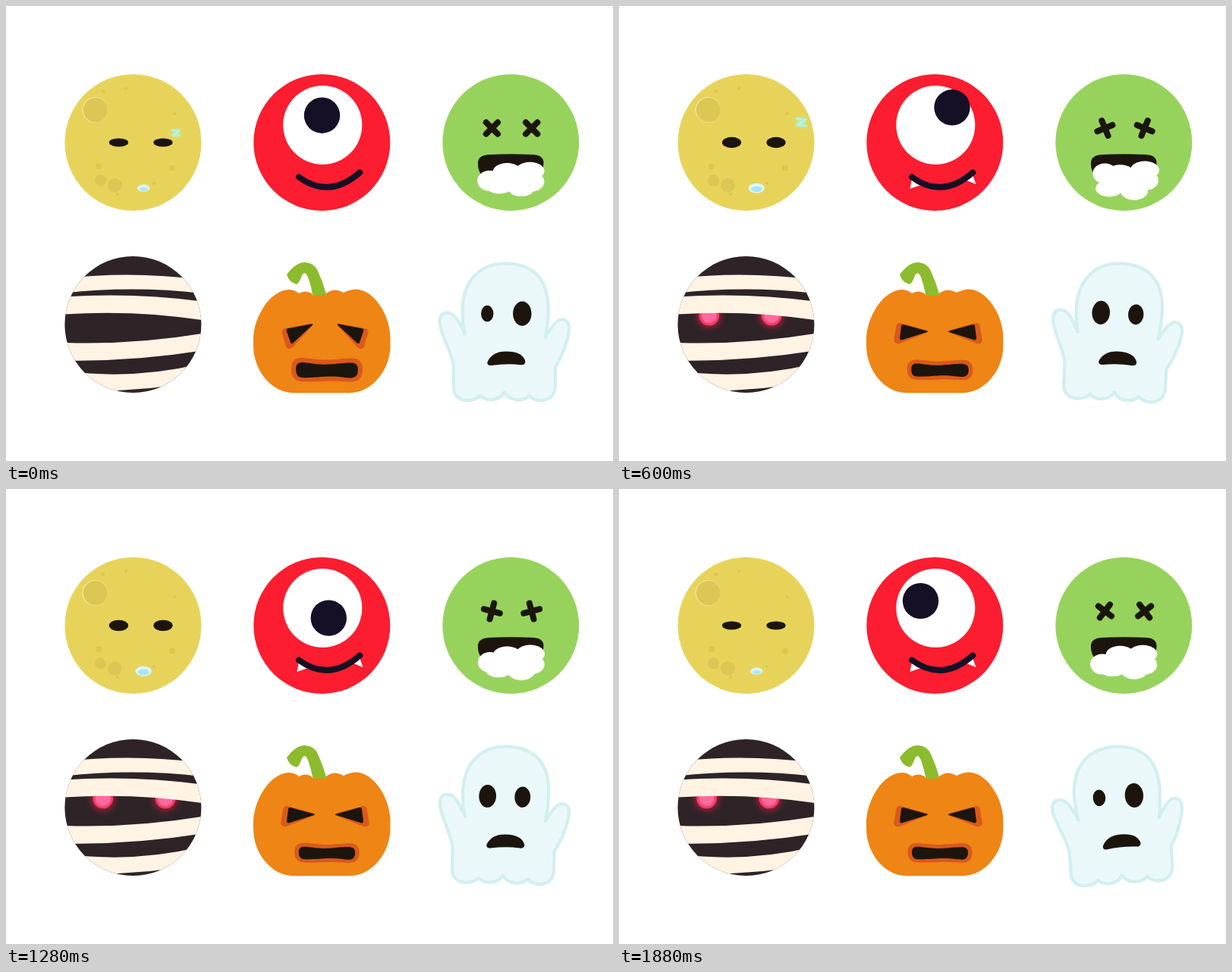
An HTML page with a canvas that plays this animation: 800 px wide and 600 px high, repeating every 1.92 s.

```html
<!DOCTYPE html>
<html lang="en">
<head>
<meta charset="utf-8">
<title>Six spooky faces</title>
<style>
html, body { margin: 0; width: 100%; height: 100%; overflow: hidden; background: #fff; }
canvas { display: block; width: 800px; height: 600px; }
</style>
</head>
<body>
<canvas id="stage" width="800" height="600"></canvas>
<script>
const g = document.getElementById('stage').getContext('2d');
const LOOP = 1920, STEP = 40;
const INK = '#1c150d';

const clamp = u => Math.min(1, Math.max(0, u));
const easeOut = u => 1 - Math.pow(1 - clamp(u), 3);
// Cosine swing between -1 and 1 that peaks at the given time
const swing = (t, period, peak = 0) => Math.cos((t - peak) / period * Math.PI * 2);

// Smooth path through key points [time, x, y] without overshoot
function glide(t, keys, axis) {
  const last = keys.length - 1;
  let i = 0;
  while (i < last - 1 && t >= keys[i + 1][0]) i++;
  const slope = j => (keys[j + 1][axis] - keys[j][axis]) / (keys[j + 1][0] - keys[j][0]);
  const tangent = j => {
    const a = slope(Math.max(j - 1, 0)), b = slope(Math.min(j, last - 1));
    return a * b > 0 ? 2 * a * b / (a + b) : 0;
  };
  const d = keys[i + 1][0] - keys[i][0], u = (t - keys[i][0]) / d, w = 1 - u;
  return keys[i][axis] * (1 + 2 * u) * w * w + tangent(i) * d * u * w * w
    + keys[i + 1][axis] * u * u * (3 - 2 * u) - tangent(i + 1) * d * u * u * w;
}

function oval(x, y, rx, ry, color) {
  g.beginPath();
  g.ellipse(x, y, rx, ry, 0, 0, Math.PI * 2);
  g.fillStyle = color;
  g.fill();
}
const disc = (x, y, r, color) => oval(x, y, r, r, color);

function shape(d, color) {
  g.fillStyle = color;
  g.fill(new Path2D(d));
}

function outline(d, color, width) {
  g.strokeStyle = color;
  g.lineWidth = width;
  g.lineCap = g.lineJoin = 'round';
  g.stroke(new Path2D(d));
}

function scoped(draw) {
  g.save();
  draw();
  g.restore();
}

function around(x, y, deg, sx = 1, sy = sx) {
  g.translate(x, y);
  g.rotate(deg * Math.PI / 180);
  g.scale(sx, sy);
  g.translate(-x, -y);
}

// Moon
const CRATERS = [
  [124.5, 229.5, 7.5], [143.5, 236, 9.5], [122, 210.7, 4], [219, 213.2, 4],
  [128, 112, 2.5], [158, 108, 2], [222, 141.5, 2], [195, 233.5, 2], [147, 247.5, 2]
];

function moon(t) {
  disc(167.5, 179.4, 90, '#e8d35a');
  disc(117.2, 136.3, 16.8, '#f0e49a');
  disc(117.8, 136.5, 16, '#dcc755');
  for (const [x, y, r] of CRATERS) disc(x, y, r, '#dcc755');

  const open = -swing(t, LOOP);
  for (const x of [148.5, 207]) oval(x, 179.4, 12.6, 6.75 + 1.15 * open, INK);
  oval(181.2, 239.6, 9.8 + 1.7 * open, 6 + 1.4 * open, '#dcf6f6');
  oval(181.5, 241, 6.8 + 1.2 * open, 3.5 + open, '#a9e6f8');

  // Drifting Z
  scoped(() => {
    const s = 1 + t / 2400;
    g.globalAlpha = clamp((1000 - t) / 200);
    g.translate(224 + t * 0.0272, 166.6 - t * 0.0233);
    g.rotate(t / 6300);
    g.scale(s, s);
    g.shadowColor = '#a8f8e8';
    g.shadowBlur = 4;
    outline('M-5 -3.2 L4.6 -3.2 L-4.2 3.2 L5.2 3.2', '#a9f6ea', 2.2);
  });
}

// One-eyed red face
const GAZE = [
  [0, 416.5, 143.6], [320, 434.5, 132.6], [600, 439, 133.2], [760, 437, 150.2],
  [1040, 427.5, 165.8], [1480, 423, 170.7], [1680, 404, 153.4], [1880, 397.5, 147]
];

function cyclops(t) {
  disc(416.3, 179.4, 90, '#fc1d30');
  disc(417.3, 156.4, 52, '#fff');
  disc(glide(t, GAZE, 1), glide(t, GAZE, 2), 23.7, '#151025');

  const grow = easeOut(t / 280);
  scoped(() => {
    around(391, 230, 0, grow);
    shape('M386 228 L383.5 240.5 L398 235.5 Z', '#fff');
  });
  scoped(() => {
    around(463, 225, 0, grow);
    shape('M466 222 L470.5 234.5 L458 229.5 Z', '#fff');
  });
  outline('M386 225 Q426 254.5 466.3 219', '#151025', 8);
}

// Zombie foam: x, y, radii, sway in x and y
const FOAM = [
  [638.5, 226, 16, 13.5, 2, -6], [660.5, 219.3, 19, 12, 0, 1.5],
  [691.5, 216.6, 19, 12, 1.5, -0.8], [693, 230.5, 17, 13, 1, -1],
  [648.5, 237.6, 18, 11, -2.5, 2.5], [679, 241, 18, 11.5, 0, 3],
  [666, 230, 22, 14, 0, 0]
];

function zombie(t) {
  disc(665.3, 179.4, 90, '#97d35c');
  const angle = 45 + t * 360 / LOOP;
  for (const [x, dir] of [[640.4, 1], [692.7, -1]]) scoped(() => {
    around(x, 160.5, angle * dir);
    outline(`M${x - 10.8} 160.5 h21.6 M${x} 149.7 v21.6`, INK, 8);
  });
  shape('M622 208 Q621 196.5 636 195.5 Q665 194 695 195.5 Q709 196.5 708.5 207 ' +
    'C708 226 690 236 665 236 C640 236 622 226 622 208 Z', INK);
  const w = swing(t, LOOP, 700);
  for (const [x, y, rx, ry, dx, dy] of FOAM) oval(x + dx * w, y + dy * w, rx, ry, '#fff');
}

// Mummy
const BANDAGES = [
  'M77 358.5 Q167.5 348.5 258 360.5 V378.5 Q167.5 367.8 77 378 Z',
  'M77 383 Q167.5 377 258 389 V413.5 Q167.5 399.9 77 406 Z',
  'M77 443.5 Q167.5 446.5 258 431.5 V454 Q167.5 468.5 77 467 Z',
  'M77 480.5 Q167.5 493 258 471 V494 Q167.5 510.6 77 506 Z'
];

function mummy(t) {
  disc(167.4, 419.4, 90, '#2e2427');
  scoped(() => {
    g.beginPath();
    g.arc(167.4, 419.4, 90, 0, Math.PI * 2);
    g.clip();
    scoped(() => {
      g.beginPath();
      g.rect(70, 395, 200, 50);
      g.clip();
      const rise = clamp(t / 560);
      const x = 122.5 + 7 * rise * swing(t, 1500, 1110), y = 382 + 25.4 * rise;
      for (const ex of [x, x + 82.3]) scoped(() => {
        g.shadowColor = '#ff1f4c';
        g.shadowBlur = 11;
        disc(ex, y, 13.3, '#fb3a62');
        g.shadowColor = '#ff69a0';
        g.shadowBlur = 2;
        disc(ex, y, 9.8, '#ff69a0');
      });
    });
    for (const d of BANDAGES) shape(d, '#fff4e4');
  });
}

// Pumpkin
const PUMPKIN = 'M326 440 C326 410 348 374 373 373.5 Q380 373.5 386 378.5 Q394 373.5 403 378.5 ' +
  'L404 381 L422 378.5 Q433 370 445 377.5 Q454 373 461 373 C486 374 506.5 408 506.5 438 ' +
  'L506.5 448 C506 480 482 509.6 453 509.6 L379 509.6 C350 509.6 326 480 326 447 Z';
const STEM = 'M370 353.5 Q382 337.5 394 337.5 Q406 338 411 349 Q418 364 422.5 381 L404.5 381.5 ' +
  'Q402 368 398 357 Q393.5 347 389.5 356 Q387 364 383 366.5 Q373 364 370 353.5 Z';
const LIPS = 'M376 478 Q376 464 388 463.5 C400 463.5 410 466.5 424 466 C440 465.5 448 463.5 457 464 ' +
  'Q470 465 470 479 Q470 494 457 495 C446 495.5 438 493.5 424 494 C408 495 398 495 388 494.5 Q376 493 376 478 Z';
const GAPE = 'M382 478 Q382 470 389 469.5 C400 469.5 408 473 424 472 C440 471 448 469.5 457 470 ' +
  'Q464 471 464 479 Q464 489 456 490 C446 490 440 487.5 424 488 C408 489 398 490 389 489.5 Q382 488.5 382 478 Z';

function pumpkin(t) {
  shape(PUMPKIN, '#ef8514');
  shape(STEM, '#8cbb2d');
  const tilt = -26 * (1 - easeOut(t / 300));
  for (const flip of [1, -1]) scoped(() => {
    around(420.5, 0, 0, flip, 1);
    around(384.5, 429.5, tilt);
    shape('M365.5 421 Q366.5 417 371 417.5 L405 427 Q408.5 428.5 405 430.5 ' +
      'L370 444.5 Q362 446 362.3 439 Z', '#d9591b');
    shape('M372 421.5 Q372.3 419 375 419.5 L406 428 Q408 428.7 406 429.5 ' +
      'L372.5 439.8 Q369.8 440 370 437.5 Z', INK);
  });
  // The mouth shrinks and settles like a damped spring
  const k = 0.095 * (1 - Math.exp(-t / 500) * swing(t, 700));
  scoped(() => {
    around(422.8, 479.2, 0, 1 - k, 1 - 1.9 * k);
    shape(LIPS, '#d9591b');
    shape(GAPE, INK);
  });
}

// Ghost
const SHEET = 'M605 432 C598 418 592 404 581 404 C574 404 570 411 572 420 ' +
  'C575 437 590 462 590 475 L590 502 C590 523 617 523 625 513 C632 521 650 521 657 509 ' +
  'C664 521 682 521 690 513 C698 523 724 523 724 500 L724 475 C734 460 742 436 742 424 ' +
  'C742 413 734 411 728 414 C721 418 716 428 711 436 C713 425 715 410 714.5 395 ' +
  'C713 355 690 339 658 339 C626 339 602 360 601.5 400 C601.5 415 603 425 605 432 Z';

function ghost(t) {
  scoped(() => {
    around(658, 424, 2.7 - t * 0.0022 + 2.6 * swing(t, 960, 460));
    shape(SHEET, '#ebf8fa');
    outline(SHEET, '#d3efef', 4.3);
    const wide = -swing(t, 960);
    const left = 10.3 + 2.1 * wide, right = 11 - 1.2 * wide;
    oval(634.2, 405, left, left * 1.32, INK);
    oval(680.3, 405, right, right * 1.32, INK);
    shape('M634.5 469 Q641 455 659 455 Q681 455 684.5 468 Q684.5 473 678 472.5 ' +
      'Q660 470.5 640 473.5 Q634 474 634.5 469 Z', INK);
  });
}

function frame(now) {
  const t = Math.floor(now % LOOP / STEP) * STEP;
  g.fillStyle = '#fff';
  g.fillRect(0, 0, 800, 600);
  scoped(() => {
    g.translate(0, 0.6);
    for (const face of [moon, cyclops, zombie, mummy, pumpkin, ghost]) face(t);
  });
}

const start = performance.now();
function tick() {
  frame(performance.now() - start);
  requestAnimationFrame(tick);
}
tick();
</script>
</body>
</html>
```
